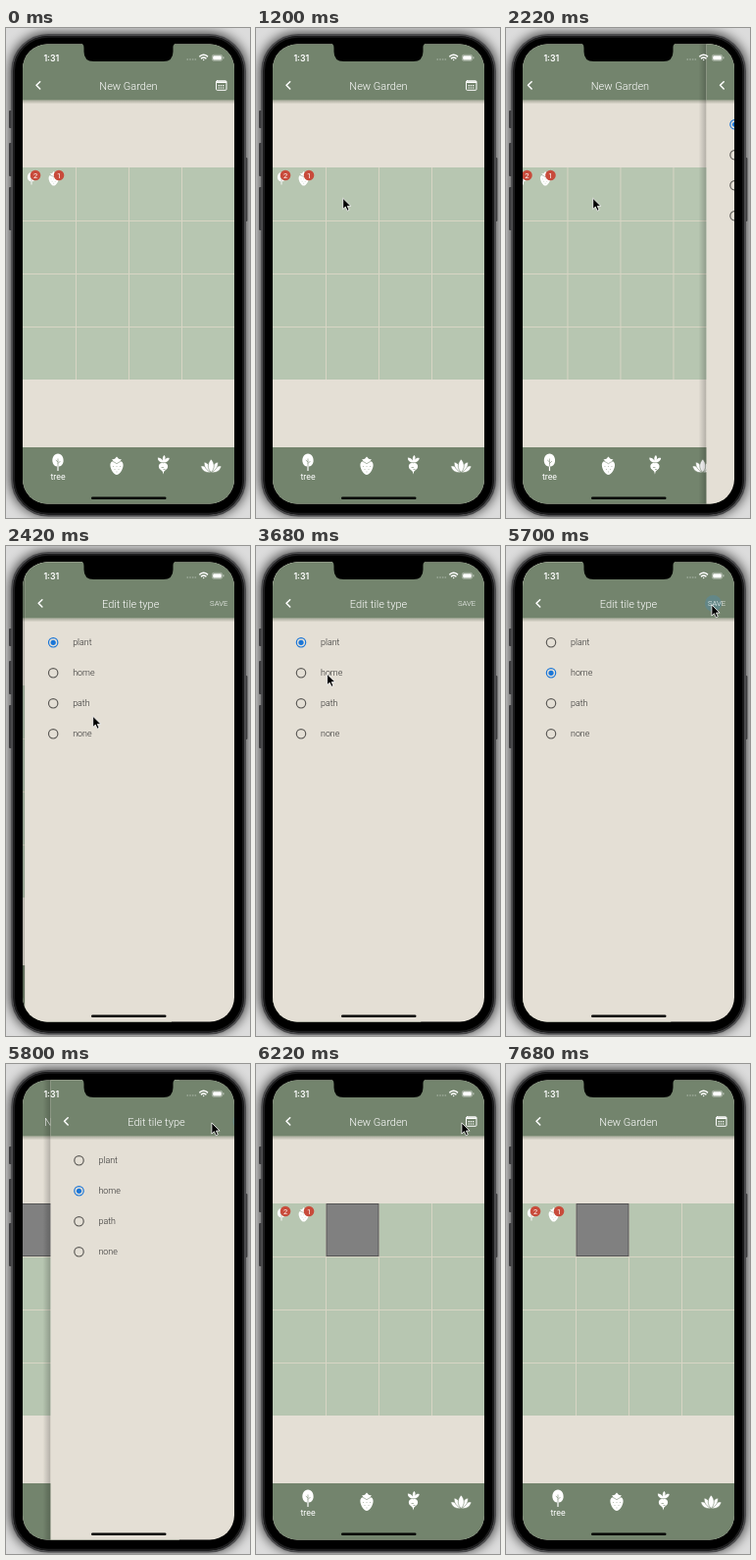
Write an HTML page that moves like this. It is 249 px wide and 499 px high and loops after 8.54 s.

```html
<!DOCTYPE html>
<html lang="en">
<head>
<meta charset="utf-8">
<title>Garden planner</title>
<style>
  html, body { margin: 0; width: 100%; height: 100%; overflow: hidden; background: #dcdcdc; }
  svg { display: block; width: 249px; height: 499px; }
  text { font-family: Roboto, Inter, sans-serif; font-weight: 300; }
  .title { font-size: 11px; fill: #fff; text-anchor: middle; }
  .option { font-size: 8.9px; fill: #2c2c2c; }
  .badge { font-size: 7.5px; fill: #fff; text-anchor: middle; font-weight: 400; }
  .line { fill: none; stroke: #fff; stroke-linecap: round; stroke-linejoin: round; }
</style>
</head>
<body>
<svg viewBox="0 0 249 499">
  <defs>
    <clipPath id="screen"><rect x="17" y="16.500" width="216" height="468" rx="25"/></clipPath>
    <filter id="blur" x="-20%" y="-20%" width="140%" height="140%"><feGaussianBlur stdDeviation="6"/></filter>
    <linearGradient id="drop" x2="0" y2="1">
      <stop stop-color="#4b553f" stop-opacity=".38"/><stop offset="1" stop-color="#4b553f" stop-opacity="0"/>
    </linearGradient>
    <linearGradient id="side">
      <stop stop-opacity="0"/><stop offset="1" stop-opacity=".22"/>
    </linearGradient>

    <g id="tree" fill="#fff">
      <path d="M0-9C4-9 6-5 5.600-1C5.300 2 3 4 .6 4V8.500H-.6V4C-3 4-5.300 2-5.600-1C-6-5-4-9 0-9Z"/>
      <path d="M0 4V-4M0 1L2.500-1.500M0-.5L-2.200-2.500" fill="none" stroke="#73836c" stroke-width=".6"/>
    </g>
    <g id="strawberry">
      <path fill="#fff" d="M0-5C3-6.500 6.800-4.500 6.600-.8C6.400 3.500 3 9 0 9C-3 9-6.400 3.500-6.600-.8C-6.800-4.500-3-6.500 0-5Z"/>
      <path fill="#fff" d="M-5-6.500L-2-7.200L0-9.500L2-7.200L5-6.500L2.500-4.200L0-3L-2.500-4.200Z"/>
      <path class="line" style="stroke:#73836c" stroke-width=".6" d="M-4.500-4.800L-2-3.600L0-2.300L2-3.600L4.500-4.800"/>
      <path style="stroke:#a9b4a4" stroke-width=".8" d="M-3.500 0v1M0 0v1M3.500 0v1M-2 3v1M2 3v1M0 5.500v1"/>
    </g>
    <g id="radish">
      <path fill="#fff" d="M0-1.200C3-2 5 0 4.600 2.600C4.200 5.300 1.600 5.800 .7 7.200L0 10L-.7 7.200C-1.600 5.800-4.200 5.300-4.600 2.600C-5 0-3-2 0-1.200Z"/>
      <path fill="#fff" d="M-.5-2C-3-2-5.800-3.500-5.600-7C-3.500-6.800-1.500-6-.5-4C-1-6.500-.5-8.500 1-9.500C2.300-8.200 2.300-6.500 1.700-4.800C3-6.500 4.500-7 6.200-6.500C6-3.800 3.500-2 .5-2Z"/>
      <path style="stroke:#73836c" stroke-width=".6" d="M-2 3h2.500M0 5h2"/>
    </g>
    <g id="lotus" fill="#fff" stroke="#73836c" stroke-width=".6">
      <path d="M0 6C-5 7-9.500 4.500-10.500-.5C-6-1-2 1.500 0 6ZM0 6C5 7 9.500 4.500 10.500-.5C6-1 2 1.500 0 6Z"/>
      <path d="M0 6C-5 4-7.500 0-7-4.500C-3-3.500 0 0 0 6ZM0 6C5 4 7.500 0 7-4.500C3-3.500 0 0 0 6Z"/>
      <path d="M0 6C-4 2-4-3 0-7.500C4-3 4 2 0 6Z"/>
    </g>
    <g id="bar">
      <rect x="17" y="73.500" width="216" height="4" fill="url(#drop)"/>
      <rect x="17" y="0" width="216" height="73.500" fill="#73846d"/>
      <path class="line" stroke-width="1.500" d="M34.700 54.700L31 58.300L34.700 62"/>
    </g>
  </defs>

  <!-- phone body -->
  <rect x="4" y="5" width="242" height="492" rx="38" fill="#000" opacity=".75" filter="url(#blur)"/>
  <g fill="#3c3c3e">
    <rect x="3" y="84" width="4" height="18" rx="1"/>
    <rect x="3" y="117" width="4" height="34" rx="1"/>
    <rect x="3" y="162" width="4" height="44" rx="1"/>
    <rect x="243" y="132" width="3.400" height="65" rx="1"/>
  </g>
  <rect x="6.300" y="7" width="237.600" height="489.500" rx="37" fill="#000" stroke="#4b4b4d" stroke-width="2.200"/>
  <rect x="8.200" y="8.900" width="233.800" height="485.700" rx="35" fill="#000" stroke="#1d1d1e" stroke-width="1.600"/>

  <g clip-path="url(#screen)">
    <g id="garden">
      <rect x="17" y="16" width="216" height="469" fill="#e4dfd5"/>
      <use href="#bar"/>
      <text class="title" x="125" y="62.500">New Garden</text>
      <g class="line" stroke-width="1">
        <rect x="214.500" y="53.800" width="10.500" height="9.500" rx="1"/>
        <path stroke-width="1.800" stroke-linecap="butt" d="M214.500 55.200h10.500"/>
        <path stroke-width="1.200" stroke-linecap="butt" stroke-dasharray="1.300 .9" d="M216.600 58.600h6.600M216.600 61h6.600"/>
      </g>
      <rect x="17" y="142" width="216" height="216" fill="#b7c6b1"/>
      <path stroke="#d8d5c4" fill="none" d="M71.500 142v216M125.500 142v216M179.500 142v216M17 196.500h216M17 250.500h216M17 304.500h216"/>
      <use href="#tree" transform="translate(26 153.500) scale(.72)"/>
      <use href="#strawberry" transform="translate(48.700 153.500) scale(.78)"/>
      <circle cx="30" cy="150" r="5.300" fill="#c84b3b"/>
      <circle cx="54" cy="150" r="5.300" fill="#c84b3b"/>
      <text class="badge" x="30" y="152.700">2</text>
      <text class="badge" x="54" y="152.700">1</text>
      <rect id="tile" x="72" y="142.500" width="53" height="53" fill="#808080" stroke="#555"/>
      <rect x="17" y="427" width="216" height="58" fill="#73846d"/>
      <use href="#tree" x="53" y="442.500"/>
      <text x="53" y="459.800" font-size="8.800" fill="#fff" text-anchor="middle" style="font-weight:400">tree</text>
      <use href="#strawberry" x="113" y="446"/>
      <use href="#radish" x="160.500" y="444.500"/>
      <use href="#lotus" x="209.300" y="446.500"/>
    </g>

    <g id="editor">
      <rect x="9" y="16" width="8" height="469" fill="url(#side)"/>
      <rect x="17" y="16" width="216" height="469" fill="#e4dfd5"/>
      <use href="#bar"/>
      <text class="title" x="125" y="62.500">Edit tile type</text>
      <circle id="ripple" cx="211.500" cy="58.500" fill="#3f8fc4"/>
      <text x="215" y="61.200" font-size="7.700" fill="#fff" text-anchor="middle">SAVE</text>
      <g id="options"></g>
    </g>

    <!-- status bar -->
    <text x="46.300" y="33.700" font-size="8.800" fill="#fff" text-anchor="middle" style="font-family:Inter,sans-serif;font-weight:600">1:31</text>
    <path stroke="#fff" opacity=".45" stroke-width="1.200" stroke-dasharray="1.500 1.200" d="M184.500 32h10"/>
    <g class="line" stroke-width="1.400">
      <path d="M197.800 28.900Q201.700 25.600 205.600 28.900M199.400 30.900Q201.700 29 204 30.900"/>
      <path d="M201.700 32.500v.1"/>
    </g>
    <rect x="210.300" y="27.300" width="10.400" height="6" rx="1.700" fill="none" stroke="#fff" stroke-opacity=".5" stroke-width=".7"/>
    <rect x="211.200" y="28.200" width="8.600" height="4.200" rx="1" fill="#fff"/>
    <path stroke="#fff" opacity=".6" d="M221.900 29.300v2"/>
    <rect x="87" y="477.400" width="76.500" height="2.600" rx="1.300"/>
  </g>

  <path d="M75.500 14.500H174.500C171 16.500 170.500 17.500 170.500 20.500V24Q170.500 34 160.500 34H89.500Q79.500 34 79.500 24V20.500C79.500 17.500 79 16.500 75.500 14.500Z"/>

  <path id="cursor" fill="#000" stroke="#fff" stroke-width=".8" stroke-linejoin="round"
    d="M.4.400V11.600L3 9.200L4.800 13.300L6.800 12.400L5 8.500H8.600Z"/>
</svg>

<script>
const LOOP = 8540, WIDTH = 216;
const PUSH = 2200, PICK = 4020, PRESS = 5320, POP = 5780;
const $ = id => document.getElementById(id);
const clamp = v => Math.max(0, Math.min(1, v));
const smooth = v => v * v * (3 - 2 * v);

// Cursor moves: start, end, x and y reached at the end
const START = [17, 279];
const MOVES = [
  [540, 1040, 88.300, 172.900],
  [3000, 3680, 72.200, 130],
  [4080, 4840, 205.200, 65.500],
  [4940, 5180, 209.500, 59.500],
  [6960, 7020, 208.800, 59],
  [7140, 7680, 150, -16]
];

$("options").innerHTML = ["plant", "home", "path", "none"].map((name, i) => {
  const y = 98.300 + 31 * i;
  return `<circle class="ring" cx="46" cy="${y}" r="4.700" fill="none" stroke-width="1.200"/>
    <circle class="dot" cx="46" cy="${y}" fill="#1a76d8"/>
    <text class="option" x="66" y="${y + 3}">${name}</text>`;
}).join("");
const rings = document.querySelectorAll(".ring");
const dots = document.querySelectorAll(".dot");

// Critically damped settle from 0 to 1
function settle(ms) {
  if (ms <= 0) return 0;
  const k = ms * 0.03;
  return ms > 380 ? 1 : 1 - (1 + k) * Math.exp(-k);
}

function cursorAt(t) {
  let [x, y] = START;
  for (const [from, to, nx, ny] of MOVES) {
    const p = smooth(clamp((t - from) / (to - from)));
    x += (nx - x) * p;
    y += (ny - y) * p;
  }
  return [x, y];
}

function place(node, x, y = 0) {
  node.setAttribute("transform", `translate(${x.toFixed(2)} ${y.toFixed(2)})`);
}

function show(node, on) {
  node.style.display = on ? "" : "none";
}

function draw(t) {
  const open = settle(t - PUSH) - settle(t - POP);
  place($("editor"), WIDTH * (1 - open));
  place($("garden"), -WIDTH * 0.3 * open);
  show($("editor"), open > 0);
  show($("tile"), t >= POP);

  const picked = clamp((t - PICK) / 120);
  const sizes = [1 - picked, picked, 0, 0];
  const current = t < PICK ? 0 : 1;
  rings.forEach((ring, i) => ring.setAttribute("stroke", i === current ? "#1a76d8" : "#5c5a56"));
  dots.forEach((dot, i) => dot.setAttribute("r", 2.600 * sizes[i]));

  const grow = smooth(clamp((t - PRESS) / 380));
  $("ripple").setAttribute("r", 8.500 * grow);
  $("ripple").setAttribute("opacity", t < PRESS ? 0 : 0.3 * (1 - clamp((t - 5720) / 300)));

  place($("cursor"), ...cursorAt(t));
  show($("cursor"), t >= 560 && t < 7680);
}

const begin = performance.now();
function tick() {
  draw((performance.now() - begin) % LOOP);
  requestAnimationFrame(tick);
}
tick();
</script>
</body>
</html>
```
